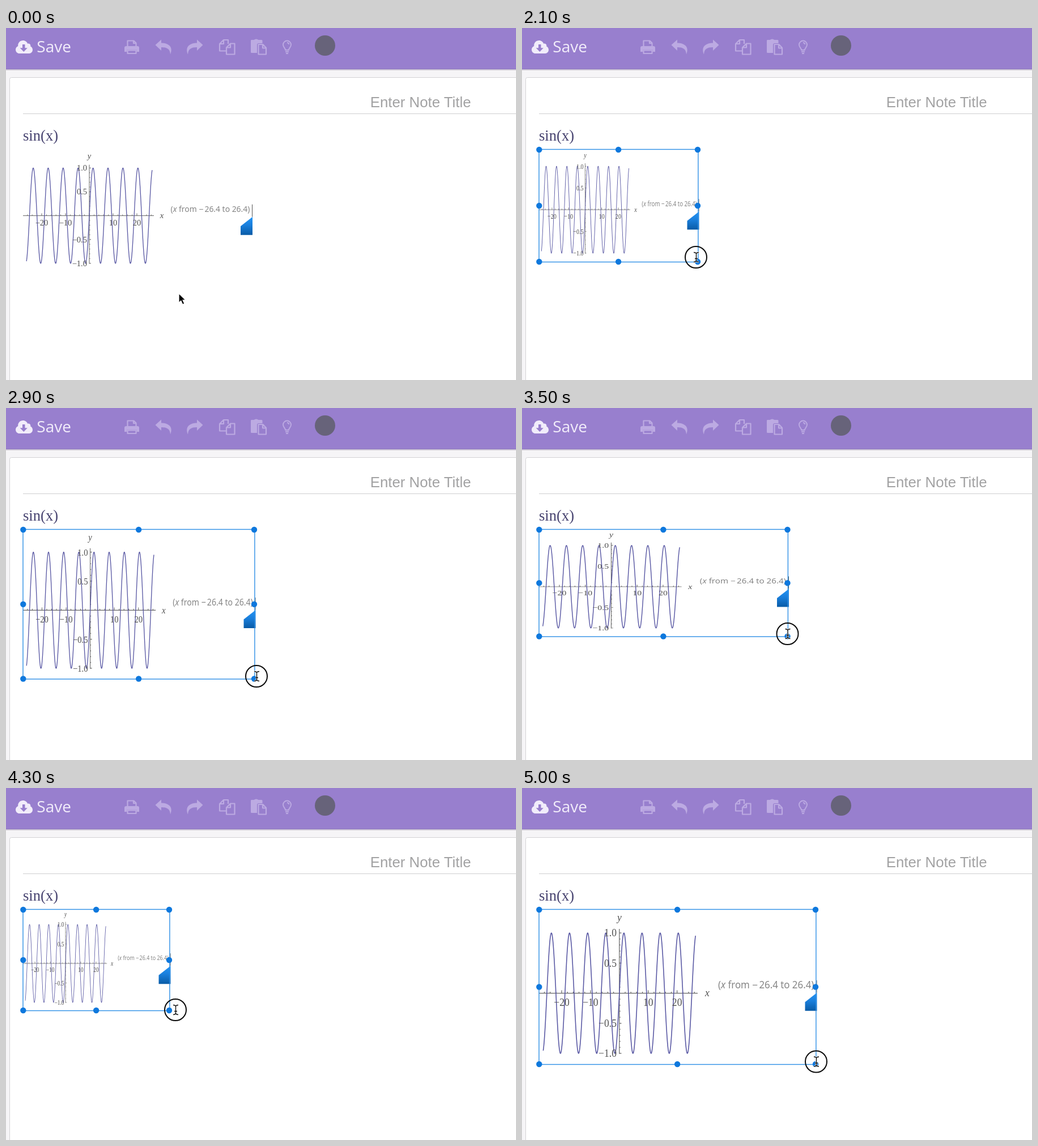
An HTML page for the animation above (5100 ms loop, 900 by 622 pixels).

```html
<!DOCTYPE html>
<html lang="en">
<head>
<meta charset="utf-8">
<title>Resizing a plot</title>
<style>
  html, body { margin: 0; width: 100%; height: 100%; overflow: hidden; background: #fff; }
  svg { display: block; width: 100vw; height: 100vh; }
  .sans { font-family: "Liberation Sans", Arial, sans-serif; }
  .open { font-family: "Open Sans", sans-serif; }
  .serif { font-family: "Liberation Serif", "Times New Roman", serif; }
  .note { font-family: "Noto Sans", sans-serif; }
  .it { font-style: italic; }
</style>
</head>
<body>
<svg viewBox="0 0 900 622">
  <defs>
    <linearGradient id="blue" x1="0" y1="0" x2="0" y2="1">
      <stop offset="0" stop-color="#2394f5"/>
      <stop offset=".45" stop-color="#1a7fdc"/>
      <stop offset="1" stop-color="#095ba6"/>
    </linearGradient>
    <path id="bar" d="M-4 -8.500Q0 -8.500 0.500 -6Q1 -8.500 5 -8.500M0.500 -6V6M-4 8.500Q0 8.500 0.500 6Q1 8.500 5 8.500M-2 2.500H3"/>
  </defs>

  <!-- page -->
  <rect width="900" height="622" fill="#f6f5f7"/>
  <rect x="6.5" y="87.5" width="910" height="550" rx="3" fill="#fff" stroke="#d3d2d5"/>
  <rect width="900" height="73" fill="#987fce"/>
  <rect y="72" width="900" height="1" fill="#8e78bd"/>
  <rect y="73" width="900" height="2" fill="#d2cdda"/>

  <!-- toolbar -->
  <path fill="#f1ecfa" d="M24 45C19.500 45 17 41.800 17 38.200C17 35 19 32.800 21.200 31.900C20.800 26 25 22 30 22C34 22 37 24.500 38.200 27.800C41.500 26.700 44 29.500 43.200 32.500C45.800 33.500 47 36 47 38.600C47 42.300 44.300 45 41 45Z"/>
  <path fill="#987fce" d="M29 29h4.500v6.200h4.300L31.300 42L24.700 35.200H29Z"/>
  <text class="open" x="54.300" y="43" font-size="28" fill="#f1ecfa">Save</text>
  <g fill="none" stroke="#bcaae2" stroke-width="2.200" stroke-linejoin="round">
    <path d="M214.500 33V22.500h11l4 4V33M225 22.500v4.500h4.500M214.500 39.500h15v5.500h-15Z"/>
    <path fill="#bcaae2" stroke="none" d="M212 32h20q3 0 3 3v7h-4.500v-3.500h-17V42H209v-7q0-3 3-3Z"/>
    <path id="undo" fill="#bcaae2" stroke="none" d="M263.500 30L274 20.500V26.500C285 26.500 296 32 290 46.500C289.500 37 284 34 274 34V40Z"/>
    <use href="#undo" transform="translate(611 0) scale(-1 1)"/>
    <path d="M388 40.500h-11V28l7-7h8v7M384 21v7h-7M389 46.500V34.500l7-7h7.500v19ZM396 27.500v7h-7"/>
    <path fill="#bcaae2" stroke="none" d="M433 21h4.500q4-3 8 0H451q1.500 0 1.500 1.500V27H446q-3 0-3 3v14H433.500q-1.500 0-1.500-1.500V22.500Q432 21 433 21Z"/>
    <path d="M445.500 29h8l5.500 6v11.500h-13.500ZM453 29v6.500h6"/>
    <path stroke-width="1.900" d="M493 39C493 35.500 489 34 489 29.500a7 7 0 0 1 14 0C503 34 499 35.500 499 39ZM493 42h6M494 45h4M496 26q3 0 3.500 3"/>
  </g>
  <circle cx="563" cy="31" r="18" fill="#67637a"/>

  <!-- note -->
  <text class="sans" x="642.700" y="139.500" font-size="25.800" fill="#a2a2a3">Enter Note Title</text>
  <path d="M30 151.500H900" stroke="#cfcfd0"/>
  <text class="serif" x="30" y="198.500" font-size="26.600" fill="#474370">sin(x)</text>

  <g id="plot">
    <path id="axes" fill="none" stroke="#666" stroke-width="1"/>
    <path id="wave" fill="none" stroke="#5857a3" stroke-width="1.300" stroke-linejoin="round"/>
    <g id="labels" class="serif" font-size="14.500" fill="#505050"></g>
    <text class="note" x="260.600" y="111" font-size="13.900" fill="#858585">(<tspan class="it">x</tspan> from −<tspan dx="2">26.4 to 26.4)</tspan></text>
  </g>
  <g id="handle">
    <path d="M1.500 -12V10" stroke="#555"/>
    <path d="M2 10V42H-19V26.500Z" fill="url(#blue)"/>
  </g>
  <g id="frame">
    <rect id="box" x="30" y="214.500" fill="none" stroke="#2e8fe6" stroke-width="1.400"/>
    <g id="dots" fill="#0e78dd"></g>
  </g>

  <!-- pointers -->
  <path id="arrow" d="M0 0V16.500L3.800 13L6.700 19.500L9.800 18L7 11.800H12Z" fill="#000" stroke="#fff" stroke-width="1.200"/>
  <g id="beam" fill="none">
    <circle r="19" stroke="#0a0a0a" stroke-width="2"/>
    <use href="#bar" stroke="#fff" stroke-width="2.800"/>
    <use href="#bar" stroke="#111" stroke-width="1.400"/>
  </g>
</svg>
<script>
const NS = 'http://www.w3.org/2000/svg';
const $ = id => document.getElementById(id);
const add = (parent, tag, attrs, text = '') => {
  const el = document.createElementNS(NS, tag);
  for (const k in attrs) el.setAttribute(k, attrs[k]);
  el.textContent = text;
  return parent.appendChild(el);
};

// The selection box is PAD taller than the plot image, which sits RISE higher
const LEFT = 30, TOP = 215, PAD = 4, RISE = 1.4;
const WIDE = 403, HIGH = 213.5;
const OX = 117, OY = 118, UNIT = 4.2, AMP = 84.3;

let d = '';
for (let x = -26.4; x <= 26.41; x += 0.1)
  d += (d ? 'L' : 'M') + (OX + x * UNIT).toFixed(2) + ' ' + (OY - AMP * Math.sin(x)).toFixed(2);
$('wave').setAttribute('d', d);

let axes = `M0 ${OY}H231M${OX} 28V203`;
for (let i = -26; i <= 26; i += 2)
  axes += `M${OX + i * UNIT} ${OY}v${i % 10 ? -2 : -4}`;
for (let i = -10; i <= 10; i++)
  axes += `M${OX} ${OY - i * AMP / 10}h${i % 5 ? 1.5 : 3}`;
$('axes').setAttribute('d', axes);

const label = (x, y, anchor, text, cls = '') =>
  add($('labels'), 'text', { x, y, 'text-anchor': anchor, class: cls }, text);
for (const n of [-20, -10, 10, 20])
  label(OX + n * UNIT, OY + 17.7, 'middle', String(n).replace('-', '−'));
for (const n of [-1, -0.5, 0.5, 1])
  label(113, OY + 5 - n * AMP, 'end', n.toFixed(1).replace('-', '−'));
label(117, 17, 'middle', 'y', 'it');
label(245, OY + 4.3, 'middle', 'x', 'it');

const dots = [];
for (const v of [0, 0.5, 1])
  for (const u of [0, 0.5, 1])
    if (u !== 0.5 || v !== 0.5) dots.push({ u, v, el: add($('dots'), 'circle', { r: 5.2 }) });

// time, box right, box bottom, pointer x, pointer y
const LOOP = 5100, STEP = 100, SELECT = 600, DRAG = 1300;
const keys = [
  [0, 433, 432.5, 305, 469],
  [600, 433, 432.5, 335, 392],
  [1100, 433, 432.5, 425, 425],
  [1200, 433, 432.5, 425, 425],
  [1300, 433, 432.5, 432, 427],
  [2100, 310.5, 413.5, 307, 405],
  [2300, 300, 404, 300, 399],
  [2900, 438.5, 479, 442, 474],
  [3000, 447, 482, 449, 476],
  [3500, 469, 404, 468.5, 399],
  [4100, 263, 386, 263, 381],
  [4300, 288.5, 393.5, 299, 392],
  [4800, 506, 484, 510, 481],
  [5000, 518.5, 488.5, 519, 483.5]
];

const slope = (i, c) => (keys[i + 1][c] - keys[i][c]) / (keys[i + 1][0] - keys[i][0]);
// Flat at turning points, harmonic mean elsewhere: no overshoot
const tangent = (i, c) => {
  if (i === 0 || i === keys.length - 1) return 0;
  const a = slope(i - 1, c), b = slope(i, c);
  return a * b <= 0 ? 0 : 2 * a * b / (a + b);
};
function sample(t, c) {
  let i = 0;
  while (i < keys.length - 2 && t >= keys[i + 1][0]) i++;
  const span = keys[i + 1][0] - keys[i][0], p = keys[i][c], q = keys[i + 1][c];
  const s = Math.min(1, (t - keys[i][0]) / span), r = 1 - s;
  return p * r * r * (1 + 2 * s) + q * s * s * (3 - 2 * s)
    + span * s * r * (r * tangent(i, c) - s * tangent(i + 1, c));
}

const show = (id, on) => $(id).setAttribute('visibility', on ? 'visible' : 'hidden');
const move = (id, x, y, extra = '') =>
  $(id).setAttribute('transform', `translate(${x} ${y}) ${extra}`);

function draw(t) {
  const [right, bottom, x, y] = [1, 2, 3, 4].map(c => sample(t, c));
  const w = right - LEFT, h = bottom - TOP;
  move('plot', LEFT, TOP - RISE, `scale(${w / WIDE} ${(h - PAD) / HIGH})`);
  move('handle', right, TOP + h / 2);
  $('box').setAttribute('width', w + 0.4);
  $('box').setAttribute('height', h + 0.5);
  for (const { u, v, el } of dots) {
    el.setAttribute('cx', LEFT + 0.3 + u * (w - 0.8));
    el.setAttribute('cy', TOP + v * (h - 0.5));
  }
  show('frame', t >= SELECT);
  show('arrow', t < DRAG);
  show('beam', t >= DRAG);
  move(t < DRAG ? 'arrow' : 'beam', x, y);
}

const start = performance.now();
function tick() {
  const t = (performance.now() - start) % LOOP;
  draw(Math.floor(t / STEP) * STEP);
  requestAnimationFrame(tick);
}
tick();
</script>
</body>
</html>
```
